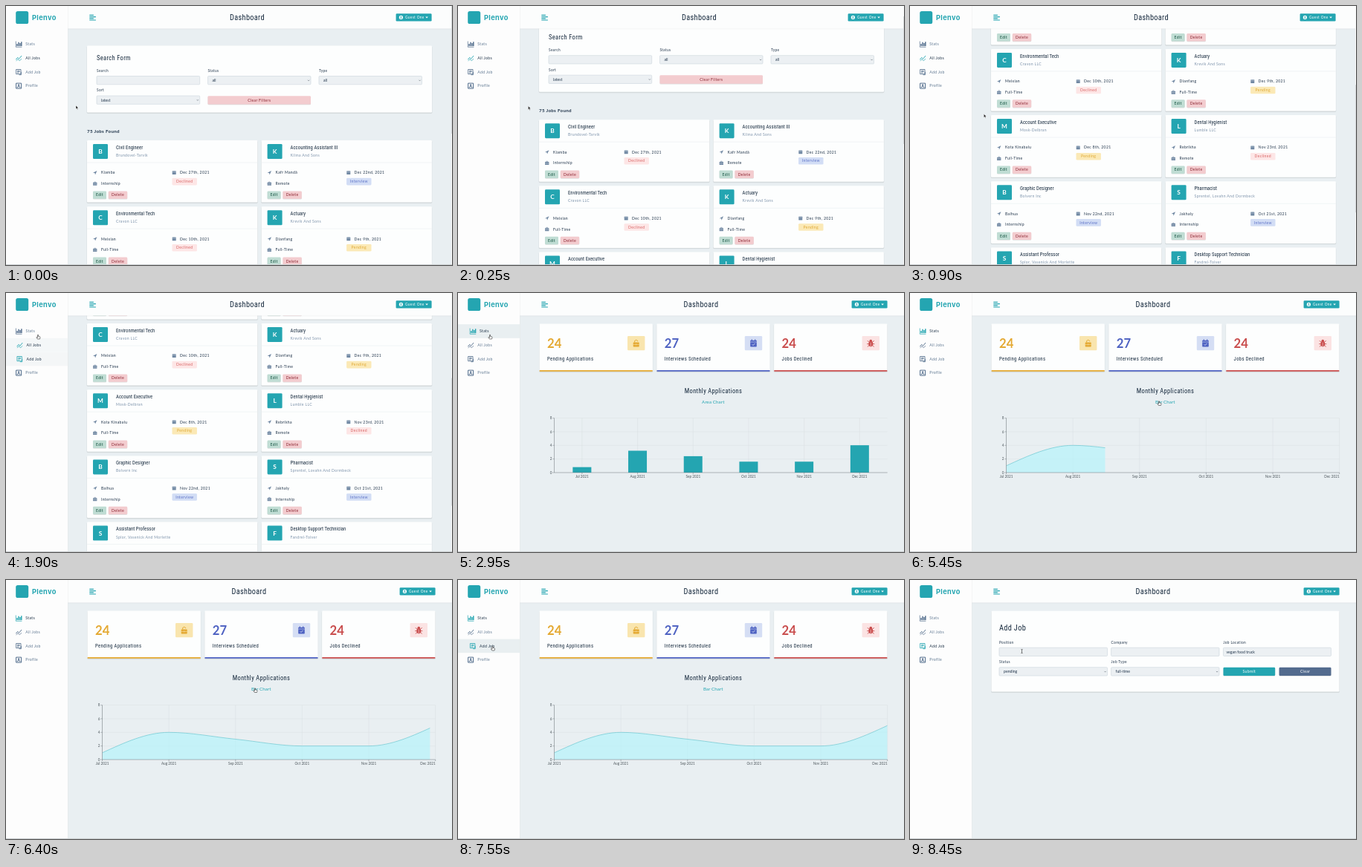
An HTML page that plays this animation: 600x349 px, repeating every 8.5 s.

```html
<!DOCTYPE html>
<html lang="en">
<head>
<meta charset="utf-8">
<title>Job tracker</title>
<style>
  html, body { margin: 0; width: 100%; height: 100%; overflow: hidden; background: #e9eff2; }
  svg { display: block; width: 100vw; height: 100vh; }
  text { font: 5.1px Lato, Cabin, sans-serif; letter-spacing: .33px; fill: #20344a; white-space: pre; }
  .head { font-family: "Roboto Condensed", Roboto, sans-serif; font-stretch: 75%; letter-spacing: var(--wide, 0); fill: #16293d; }
  .tight { letter-spacing: var(--tight, 0); font-size: 6.67px; }
  .s67 { font-size: 6.67px; }
  .s85 { font-size: 8.5px; }
  .s103 { font-size: 10.3px; }
  .muted { fill: #7d93ab; }
  .label { font-size: 4.8px; }
  .field { font-size: 5.2px; letter-spacing: 0; }
  .tick { font-size: 4.7px; letter-spacing: 0; fill: #4d565c; }
  .avatar { font-size: 8.3px; font-weight: 700; letter-spacing: 0; fill: #fff; }
  .count { font-size: 16.7px; font-weight: 700; letter-spacing: 0; }
  .found { font-size: 6.2px; font-weight: 700; }
  .toggle { font-size: 6.2px; letter-spacing: .1px; fill: #24a5b1; }
  .brand { font: 700 9.2px Inter, sans-serif; letter-spacing: .4px; fill: #24a5b1; }
  .white { fill: #fff; }
  .mid { text-anchor: middle; }
  .end { text-anchor: end; }
</style>
</head>
<body>
<svg id="stage" viewBox="0 0 600 349" preserveAspectRatio="none"></svg>
<script>
const LOOP = 8500, TEAL = '#24a5b1', SLATE = '#4f6a8a';
const TO_STATS = 2200, TO_AREA = 5150, TO_ADD = 7700, GROW = 1500;

const rect = (x, y, w, h, fill, extra = '') =>
  `<rect x="${x}" y="${y}" width="${w}" height="${h}" fill="${fill}" ${extra}/>`;
const text = (x, y, str, cls = '', extra = '') => `<text x="${x}" y="${y}" class="${cls}" ${extra}>${str}</text>`;
const line = (d, color, width = .5) => `<path d="${d}" fill="none" stroke="${color}" stroke-width="${width}"/>`;
const at = (x, y, body) => `<g transform="translate(${x} ${y})">${body}</g>`;
const card = (x, y, w, h) =>
  rect(x - .4, y + .8, w + .8, h + .6, '#000', 'rx="1.4" opacity=".09"') + rect(x, y, w, h, '#fdfefe', 'rx="1.3"');
const button = (x, y, w, h, fill, label, color) =>
  rect(x, y + .7, w, h, '#000', 'rx="1.3" opacity=".13"') + rect(x, y, w, h, fill, 'rx="1.3"') +
  text(x + w / 2, y + h / 2 + 1.8, label, 'mid', `style="fill:${color}"`);

function field(x, y, w, label, value = '', isSelect = false) {
  return text(x, y - 5.6, label, 'label') +
    rect(x, y, w, 11.3, '#ecf0f3', 'rx="1" stroke="#ccd5dc" stroke-width=".6"') +
    text(x + (isSelect ? 6 : 4), y + 7.6, value, 'field') +
    (isSelect ? line(`M${x + w - 4} ${y + 5.2}l1.1 1.2 1.1-1.2`, '#5b6670', .6) : '');
}

// Jobs page
const jobs = [
  ['Civil Engineer', 'Brundovel-Tarvik', 'Kiamba', 'Internship', 'Dec 27th, 2021', 'Declined'],
  ['Accounting Assistant III', 'Kilma And Sons', 'Kafr Mandā', 'Remote', 'Dec 22nd, 2021', 'Interview'],
  ['Environmental Tech', 'Cravon LLC', 'Meixian', 'Full-Time', 'Dec 10th, 2021', 'Declined'],
  ['Actuary', 'Krevik And Sons', 'Dianfang', 'Full-Time', 'Dec 9th, 2021', 'Pending'],
  ['Account Executive', 'Mosk-Delbran', 'Kota Kinabalu', 'Full-Time', 'Dec 8th, 2021', 'Pending'],
  ['Dental Hygienist', 'Lumble LLC', 'Rebrikha', 'Remote', 'Nov 23rd, 2021', 'Declined'],
  ['Graphic Designer', 'Bolvern Inc', 'Baihua', 'Internship', 'Nov 22nd, 2021', 'Interview'],
  ['Pharmacist', 'Sprentel, Lovahn And Dormbeck', 'Jakhaly', 'Internship', 'Oct 21st, 2021', 'Interview'],
  ['Assistant Professor', 'Splor, Vasenick And Morlette'],
  ['Desktop Support Technician', 'Fandrel-Tolver'],
];
const badges = {
  Declined: ['#fde6e6', '#d86565'],
  Interview: ['#d2ddf5', '#5a70c6'],
  Pending: ['#fbe9b6', '#dfa936'],
};
const smallIcon = {
  place: `<path d="M0 2.8 5.4 0 3 5.4 2.5 3Z" fill="#6f87a2"/>`,
  date: rect(0, .6, 5, 4.8, '#6f87a2', 'rx=".5"') + line('M0 2.2H5M1.4 0V1.2M3.6 0V1.2', '#dfe6ec', .4),
  type: rect(0, 1.2, 5.4, 4, '#6f87a2', 'rx=".5"') + line('M1.8 1.2V.4H3.6V1.2', '#6f87a2', .6) + line('M0 3.2H5.4', '#fff', .4),
};

function jobCard([title, company, place, type, date, status], i) {
  const head = card(0, 0, 229.3, 83.6) + rect(8, 5, 20, 20, TEAL, 'rx="1.3"') +
    text(18, 18, company[0], 'avatar mid') + text(39, 11.8, title, 'head tight') +
    text(39, 22, company, 'muted') + line('M0 30H229.3', '#e3e9ed', .5);
  const details = place ? at(8, 41, smallIcon.place) + text(19, 45.4, place) +
    at(114.7, 40.7, smallIcon.date) + text(125, 45.4, date) +
    at(8, 55.6, smallIcon.type) + text(19, 60.2, type) +
    rect(114.5, 50.8, 33.4, 9.6, badges[status][0], 'rx="1.3"') +
    text(131.2, 57.3, status, 'mid', `style="fill:${badges[status][1]}"`) +
    button(8, 68.4, 18, 10.4, '#c0ddd4', 'Edit', '#12523f') +
    button(28.8, 68.4, 25.4, 10.4, '#f3cccf', 'Delete', '#8a2430') : '';
  return at(i % 2 ? 343.6 : 109, 181 + (i >> 1) * 89.2, head + details);
}

const jobsPage = card(109, 53.6, 464, 90) + text(122, 73, 'Search Form', 'head s85') +
  field(122, 94.5, 138.7, 'Search') + field(271.5, 94.5, 138.5, 'Status', 'all', true) +
  field(421, 94.5, 138.5, 'Type', 'all', true) + field(122, 121, 138.7, 'Sort', 'latest', true) +
  button(271.5, 121.2, 138.5, 11.4, '#f3cccf', 'Clear Filters', '#8a2430') +
  text(109, 171.2, '75 Jobs Found', 'found') + jobs.map(jobCard).join('');

// Stats page
const PLOT = { left: 129.5, right: 577.7, top: 168.6, base: 242, max: 8 };
const values = [1, 4, 3, 2, 2, 5];
const tangents = [4.5, 0, -1, 0, 0, 4.5];
const months = ['Jul', 'Aug', 'Sep', 'Oct', 'Nov', 'Dec'].map(m => m + ' 2021');
const plotWidth = PLOT.right - PLOT.left;
const yOf = v => PLOT.base - (PLOT.base - PLOT.top) * v / PLOT.max;
const barX = i => PLOT.left + plotWidth * (i + .5) / 6;
const areaX = i => PLOT.left + plotWidth * i / 5;

const statIcons = [
  c => rect(-4, -1.2, 8, 6, c, 'rx=".7"') + line('M-2-1V-3.2Q0-5.4 2-3.2V-2.4', c, 1) + line('M-4 1.8H4M0 .8V2.8', '#f9e5ae', .6),
  c => rect(-4.3, -3.8, 8.6, 8.8, c, 'rx=".8"') + line('M-2.2-5.2V-3M2.2-5.2V-3', c, 1.2) + line('M-4.3-1.6H4.3', '#d5def4', .6) + line('M-1.8 1.6-.5 2.9 2 .3', '#d5def4', .9),
  c => `<ellipse cy="1" rx="2.9" ry="3.8" fill="${c}"/><circle cy="-3" r="1.8" fill="${c}"/>` +
    line('M-5 1H5M-4.4-3.4-2-1M4.4-3.4 2-1M-4.4 4.8-2 2.6M4.4 4.8 2 2.6', c, .9) + line('M0-1V5', '#fbe3e3', .6),
];
const statCards = [
  [24, 'Pending Applications', '#e4a932', '#f9e5ae'],
  [27, 'Interviews Scheduled', '#4e62c2', '#d5def4'],
  [24, 'Jobs Declined', '#c94d4d', '#fbe3e3'],
].map(([count, label, color, tint], i) => at(109.5 + i * 157.8, 41.6,
  card(0, 0, 152.4, 64) + rect(0, 62.3, 152.4, 1.8, color, 'rx=".8"') +
  text(10.5, 32.4, count, 'count', `style="fill:${color}"`) + text(10.5, 49.8, label, 'head s67') +
  rect(118.5, 16.4, 23.4, 19.2, tint, 'rx="1.3"') + at(130.2, 26, statIcons[i](color)))).join('');

const columns = xOf => line(values.map((_, i) => `M${xOf(i)} ${PLOT.top}V${PLOT.base}`).join(''), '#d3dbdf', .4);
const rows = [2, 4, 6, 8].map(v => line(`M${PLOT.left} ${yOf(v)}H${PLOT.right}`, '#d3dbdf', .4)).join('');
const axes = line(`M${PLOT.left} ${PLOT.top}V${PLOT.base}H${PLOT.right}`, '#6b7378', .5) +
  [0, 2, 4, 6, 8].map(v => line(`M${PLOT.left - 2} ${yOf(v)}h2`, '#6b7378', .5) +
    text(PLOT.left - 3, yOf(v) + 1.8, v, 'tick end')).join('');
const ticks = xOf => line(values.map((_, i) => `M${xOf(i)} ${PLOT.base}v2`).join(''), '#6b7378', .5);

const curve = values.map((v, i) => {
  if (!i) return `M${areaX(0)} ${yOf(v)}`;
  const third = plotWidth / 15;
  return `C${areaX(i - 1) + third} ${yOf(values[i - 1] + tangents[i - 1] / 3)} ` +
    `${areaX(i) - third} ${yOf(v - tangents[i] / 3)} ${areaX(i)} ${yOf(v)}`;
}).join('');

const barChart = columns(barX) + '<g id="bars">' + values.map((_, i) => rect(barX(i) - 12.5, 0, 25, 0, TEAL)).join('') + '</g>' +
  ticks(barX) + months.map((m, i) => text(barX(i), 248.8, m, 'tick mid')).join('');
const areaChart = columns(areaX) + `<clipPath id="reveal"><rect id="revealBox" x="${PLOT.left}" y="160" height="90"/></clipPath>
  <g clip-path="url(#reveal)"><path d="${curve}V${PLOT.base}H${PLOT.left}Z" fill="#b4f3fb" fill-opacity=".68"/>${line(curve, '#5cbfca', .6)}</g>` +
  ticks(areaX) + months.map((m, i) => i < 5 ? text(areaX(i), 248.8, m, 'tick mid') : text(PLOT.right, 248.8, m, 'tick end')).join('');

const statsPage = statCards + text(343.5, 135.4, 'Monthly Applications', 'head s85 mid') +
  text(343.3, 149, '', 'toggle mid', 'id="toggle"') + rows +
  `<g id="barChart">${barChart}</g><g id="areaChart">${areaChart}</g>` + axes;

// Add Job page
const addPage = card(109.5, 41.8, 468, 108.8) + text(120, 68.4, 'Add Job', 'head s103') +
  field(120, 91.2, 145.5, 'Position') + field(270.6, 91.2, 145.4, 'Company') +
  field(421.5, 91.2, 145, 'Job Location', 'vegan food truck') +
  field(120, 117.7, 145.5, 'Status', 'pending', true) + field(270.6, 117.7, 145.4, 'Job Type', 'full-time', true) +
  button(421.5, 117.7, 69.7, 11.4, TEAL, 'Submit', '#fff') + button(496.6, 117.7, 69.9, 11.4, '#536b8e', 'Clear', '#fff');

// Header and sidebar
const header = rect(83, 0, 517, 31.4, '#000', 'opacity=".04"') + rect(83, 0, 517, 30.4, '#fcfdfd') +
  at(112.3, 11.8, line('M0 .6H5.6M0 2.8H8.6M0 5H5.6M0 7.2H8.6', TEAL, 1.2)) +
  text(324.5, 19.2, 'Dashboard', 'head s103 mid', 'id="title"') +
  '<g id="user">' + rect(524.6, 10.2, 48, 10.4, TEAL, 'rx="1.3"') +
  '<circle cx="531.4" cy="15.4" r="2.6" fill="#fff"/>' +
  `<circle cx="531.4" cy="14.6" r=".9" fill="${TEAL}"/>` + line('M529.9 17Q531.4 15.6 532.9 17', TEAL, .8) +
  text(537, 17.2, 'Guest One', 'label white') + '<path d="M564.3 14.4h3.6l-1.8 2z" fill="#fff"/></g>';

const navItems = [
  ['Stats', 51.5, line('M.3 0V7.8H8.4', 'currentColor', .7) + line('M2 6.6V3.4M4 6.6V1.2M6 6.6V2.4M7.8 6.6V.8', 'currentColor', 1.4)],
  ['All Jobs', 70.2, line('M.4 6 2.6 3.2 4.6 5 8 .8', 'currentColor', .9) + line('M.6 7.6 3 5.6 5.4 7.4 8 5', 'currentColor', .7)],
  ['Add Job', 88.9, line('M.6.6H7V6.8H.6ZM2 2.4H5.6M2 3.8H5.6M2 5.2H4', 'currentColor', .8) + line('M7.4 3.8V7.8H4.4', 'currentColor', .8)],
  ['Profile', 107.5, line('M.6.6H7.6V7.6H.6Z', 'currentColor', 1) + '<circle cx="4.1" cy="3.1" r="1.2" fill="currentColor"/>' + line('M2 6.4Q4.1 3.6 6.2 6.4', 'currentColor', 1.1)],
];
const sidebar = rect(0, 0, 84, 349, '#000', 'opacity=".035"') + rect(0, 0, 83.2, 349, '#fdfdfd') +
  rect(13.2, 7, 17, 17, TEAL, 'rx="2.6"') + text(35, 18.8, 'Plenvo', 'brand') +
  navItems.map(([name, y, icon]) => `<g class="nav">${rect(0, y - 9.3, 83.2, 18.6, '#e9eff1')}<g>
    ${at(13, y - 4, icon)}${text(26.3, y + 1.8, name)}</g></g>`).join('');

const outline = 'stroke="#fff" stroke-width=".5"';
const cursors = {
  arrow: `<path d="M0 0V4.8L1.1 3.8 1.9 5.6 2.8 5.2 2 3.5H3.5Z" fill="#111" ${outline}/>`,
  hand: '<path d="M-.5.4Q0-.2.5.4V2.4L2.6 2.9Q3.2 3.1 3 4L2.5 6H-.7L-2.2 3.9Q-2.1 3.1-1.3 3.6L-.5 4.1Z" fill="#fff" stroke="#222" stroke-width=".55"/>',
  beam: line('M-1-2.6Q0-2.6 0-2V2Q0 2.6-1 2.6M1-2.6Q0-2.6 0-2M0 2Q0 2.6 1 2.6', '#222', .6),
};

const stage = document.getElementById('stage');
const group = (id, body) => `<g id="${id}">${body}</g>`;
stage.innerHTML = rect(0, 0, 600, 349, '#e9eff2') +
  group('jobs', group('scroller', jobsPage)) + group('stats', statsPage) + group('add', addPage) + header + sidebar +
  group('scrollbar', rect(599, 0, 1, 349, '#f8f9f9') + rect(599.2, 0, .8, 172, '#cfd3d5', 'id="thumb"')) +
  rect(0, 348, 600, 1, '#cdd1d3') +
  group('cursor', Object.entries(cursors).map(([id, body]) => group(id, body)).join(''));

const $ = id => document.getElementById(id);
const navNodes = [...document.querySelectorAll('.nav')];
const bars = [...$('bars').children];

// Heading tracking depends on whether a condensed face is available.
const condensed = $('title').getComputedTextLength() < 47;
stage.style.setProperty('--wide', condensed ? '.33px' : '-.25px');
stage.style.setProperty('--tight', condensed ? '.05px' : '-.27px');

const clamp = p => Math.min(1, Math.max(0, p));

// cubic-bezier(.25, .1, .25, 1)
function ease(p) {
  p = clamp(p);
  let lo = 0, hi = 1, u = p;
  for (let i = 0; i < 20; i++) {
    u = (lo + hi) / 2;
    if (.75 * u * (1 - u) + u ** 3 < p) lo = u; else hi = u;
  }
  return .3 * u * (1 - u) ** 2 + 3 * u * u * (1 - u) + u ** 3;
}

const pointerPath = [
  [0, 94, 134], [200, 94, 134], [900, 99.3, 145.5], [1500, 99, 145], [1670, 84, 95], [1810, 58, 79], [1900, 43, 56],
  [3250, 43, 56], [3400, 48, 70], [3600, 62, 86], [3810, 83, 98], [3900, 103.8, 113.5], [4300, 220, 136],
  [4850, 335, 145.5], [6750, 335, 145.5], [7000, 210, 126], [7250, 83, 95], [7450, 46.5, 89], [7800, 46.5, 89],
  [8050, 84, 91], [8350, 150.5, 96], [8500, 150.5, 96],
];
function pointerAt(t) {
  const i = pointerPath.findIndex(k => k[0] > t);
  const [t0, x0, y0] = pointerPath[i - 1], [t1, x1, y1] = pointerPath[i];
  const p = (t - t0) / (t1 - t0);
  return [x0 + (x1 - x0) * p, y0 + (y1 - y0) * p];
}

// [nav index, enter, leave]
const hovers = [[2, 1650, 1820], [1, 1800, 1885], [0, 1885, 3350], [1, 3350, 3500], [2, 3500, 3820], [2, 7250, 8050]];
const hoverLevel = (item, t) => Math.max(0, ...hovers.filter(h => h[0] === item).map(([, enter, leave]) =>
  ease((Math.min(t, leave) - enter) / 300) * (1 - ease((t - leave) / 300))));

const show = (id, on) => { $(id).style.display = on ? '' : 'none'; };
const move = (node, x, y) => node.setAttribute('transform', `translate(${x} ${y})`);

function render(t) {
  const page = t < TO_STATS ? 'jobs' : t < TO_ADD ? 'stats' : 'add';
  ['jobs', 'stats', 'add'].forEach(id => show(id, id === page));

  const scrolling = page === 'jobs';
  const scroll = 229.2 * (1 - (1 - clamp((t - 200) / 1207)) ** 3);
  move($('scroller'), 0, -scroll);
  show('scrollbar', scrolling);
  $('thumb').setAttribute('y', scroll / 2);
  move($('title'), scrolling ? 0 : 2.5, 0);
  move($('user'), scrolling ? 0 : 5, 0);

  const isArea = t >= TO_AREA;
  show('barChart', !isArea);
  show('areaChart', isArea);
  $('toggle').textContent = isArea ? 'Bar Chart' : 'Area Chart';
  const grown = ease((t - TO_STATS) / GROW);
  bars.forEach((bar, i) => {
    const top = yOf(values[i] * grown);
    bar.setAttribute('y', top);
    bar.setAttribute('height', PLOT.base - top);
  });
  $('revealBox').setAttribute('width', plotWidth * ease((t - TO_AREA) / GROW));

  const active = { stats: 0, jobs: 1, add: 2 }[page];
  navNodes.forEach((node, i) => {
    const [back, content] = node.children, level = hoverLevel(i, t);
    back.setAttribute('opacity', level);
    move(content, level * 2.8, 0);
    content.style.color = i === active || level > .3 ? TEAL : SLATE;
    content.lastElementChild.style.fill = i === active || level > .3 ? '#1b2f44' : '#5f7791';
  });

  const [x, y] = pointerAt(t);
  const onNav = x < 83 && y > 42 && y < 117;
  const onToggle = page === 'stats' && x > 328 && x < 359 && y > 141;
  const shape = onNav || onToggle ? 'hand' : page === 'add' && x > 120 ? 'beam' : 'arrow';
  Object.keys(cursors).forEach(id => show(id, id === shape));
  move($('cursor'), x, y);
}

const start = performance.now();
function tick() {
  render((performance.now() - start) % LOOP);
  requestAnimationFrame(tick);
}
tick();
</script>
</body>
</html>
```
